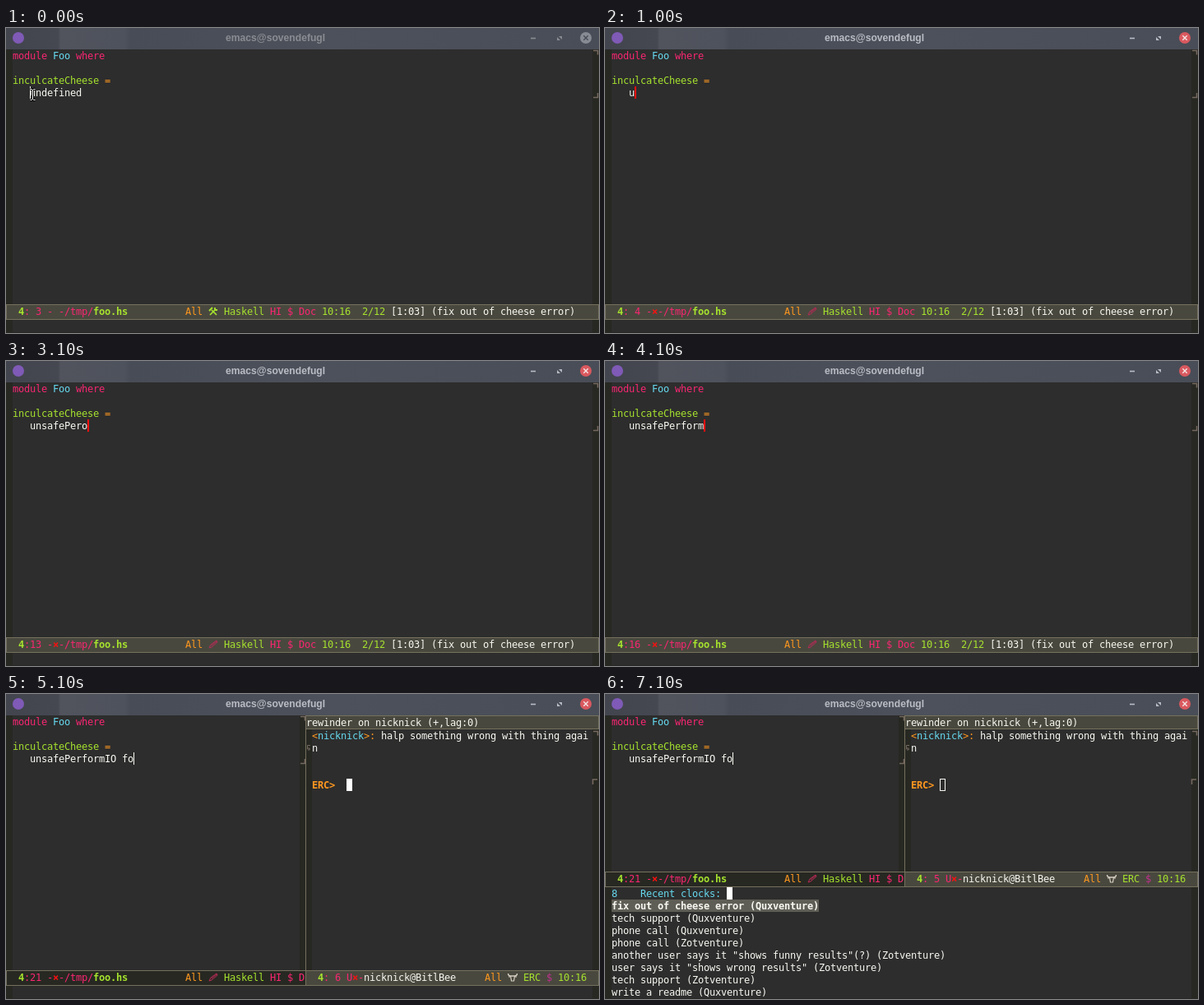
Write an HTML page that moves like this. It is 721 px wide and 371 px high and loops after 8 s.

```html
<!DOCTYPE html>
<html lang="en">
<head>
<meta charset="utf-8">
<title>Editor session</title>
<style>
  html, body { margin: 0; width: 100%; height: 100%; overflow: hidden; background: #272822; }
  svg { display: block; }
  text { font: 12px "DejaVu Sans Mono", monospace; white-space: pre; }
  .bold { font-weight: bold; }
  .title { font: bold 12.15px "Liberation Sans", Arial, sans-serif; }
</style>
</head>
<body>
<svg id="stage" width="721" height="371" viewBox="0 0 721 371">
  <defs>
    <linearGradient id="bar">
      <stop offset="0" stop-color="#42454e"/>
      <stop offset=".088" stop-color="#454851"/>
      <stop offset=".092" stop-color="#51545d"/>
      <stop offset=".2" stop-color="#4e525c"/>
      <stop offset=".21" stop-color="#484c56"/>
      <stop offset=".55" stop-color="#4d515b"/>
      <stop offset="1" stop-color="#494d57"/>
    </linearGradient>
  </defs>
  <rect width="721" height="26" fill="url(#bar)"/>
  <circle cx="15" cy="12" r="7" fill="#7f5ab6"/>
  <g id="view"></g>
</svg>
<script>
const LOOP = 8000, CELL = 7, ROW = 15;
const C = {
  bg: '#2d2d2d', fringe: '#272822', bar: '#49483e', edge: '#75715e', mark: '#75695f',
  fg: '#f8f8f2', pink: '#f92672', blue: '#66d9ef', green: '#a6e22e', orange: '#fd971f',
  red: '#ff1010', purple: '#c0308f', pick: '#5f5e56'
};
const PROJECT = ['Quxventure', 'Zotventure'];
const CLOCKS = [
  ['fix out of cheese error', 0], ['tech support', 0], ['phone call', 0], ['phone call', 1],
  ['another user says it "shows funny results"(?)', 1],
  ['user says it "shows wrong results"', 1], ['tech support', 1], ['write a readme', 0]
];

// [start, changed properties]
const STEPS = [
  [0, { code: 'undefined', col: 3, icon: 'tools', pointer: true, focus: false, cursor: C.fg,
        dirty: false, split: false, menu: false, chat: 6 }],
  [200, { focus: true, cursor: C.red }],
  [500, { icon: 'cut', cursor: null }],
  [700, { code: '', icon: 'pen', pointer: false, dirty: true, cursor: C.red }],
  ...[
    [1000, 'u'], [1200, 'un'], [1400, 'uns'], [1600, 'unsa'], [1800, 'unsaf'], [1900, 'unsafe'],
    [2200, 'unsafeP'], [2300, 'unsafePe'], [2700, 'unsafePer'], [3100, 'unsafePero'],
    [3700, 'unsafePer'], [3900, 'unsafePerf'], [4000, 'unsafePerfor'], [4100, 'unsafePerform'],
    [4400, 'unsafePerformI'], [4600, 'unsafePerformIO'], [4800, 'unsafePerformIO '],
    [4900, 'unsafePerformIO f'], [5000, 'unsafePerformIO fo']
  ].map(([at, code]) => [at, { code, col: 3 + code.length }]),
  [5100, { split: true, cursor: C.fg }],
  [6200, { chat: 5 }],
  [7100, { menu: true }]
];

const states = [];
for (const [at, change] of STEPS) {
  states.push({ ...states[states.length - 1], ...change, at });
}

const view = document.getElementById('view');

function add(tag, attrs, content) {
  const el = document.createElementNS('http://www.w3.org/2000/svg', tag);
  for (const key in attrs) el.setAttribute(key, attrs[key]);
  if (content) el.textContent = content;
  view.append(el);
}

const box = (x, y, width, height, fill) => add('rect', { x, y, width, height, fill });
const frame = (x, y, w, h, stroke, fill = 'none') =>
  add('rect', { x: x + .5, y: y + .5, width: w - 1, height: h - 1, stroke, fill });
const line = (d, stroke, width = 1) =>
  add('path', { d, stroke, fill: 'none', 'stroke-width': width });

// Places parts [text, colour, bold] on the character grid; returns the end x.
function run(x, y, ...parts) {
  for (const [str, fill, bold] of parts) {
    const xs = [...str].map((_, i) => x + i * CELL).join(' ');
    if (str.trim()) add('text', { x: xs, y, fill, class: bold ? 'bold' : '' }, str);
    x += str.length * CELL;
  }
  return x;
}

function titleBar(focus) {
  const ink = focus ? '#b9bcc4' : '#8a8c92';
  add('text', { x: 267, y: 16, fill: ink, class: 'title' }, 'emacs@sovendefugl');
  line('M638 12.5h6', ink, 1.6);
  add('path', { d: 'M672 10h4v4zM670 11v4h4z', fill: ink });
  add('circle', { cx: 705, cy: 12, r: 7, fill: focus ? '#d9595f' : '#878b94' });
  line('M702.3 9.3l5.4 5.4m0-5.4l-5.4 5.4', focus ? '#f4e4e4' : '#484c56', 1.4);
}

// Draws a mode line symbol and returns the width it takes.
function symbol(kind, x, y) {
  if (kind === 'cut') {
    run(x, y, ['✂', C.green]);
    return 7;
  }
  if (kind === 'tools') {
    line(`M${x + 2} ${y}l7 -7M${x + 10} ${y}l-6 -6`, C.green, 1.7);
    line(`M${x + 1} ${y - 5}l4 -4M${x + 8} ${y - 9}v3h3`, C.green, 1.8);
  } else if (kind === 'pen') {
    line(`M${x + 1} ${y}l3 -1l7 -6l-1 -2l-7 5z`, '#b52a55');
    line(`M${x + 4} ${y - 3}l6 -5`, '#b52a55');
  } else {
    line(`M${x + .5} ${y - 9}q0 3 3 3h5q3 0 3 -3`, '#d8d0c4', 1.3);
    line(`M${x + 3.5} ${y - 6}l1 6h3l1 -6M${x + 1} ${y - 5}h2m6 0h2`, '#d8d0c4', 1.2);
  }
  return 12;
}

const position = col => ':' + String(col).padStart(2);

function leftModeLine(s, bottom) {
  const h = s.icon === 'cut' ? 17 : 19, top = bottom - h, y = top + 13;
  frame(0, top, s.split ? 365 : 721, h, C.edge, s.split ? C.fringe : C.bar);
  run(15, y, ['4', C.green, true], [position(s.col) + ' -', C.pink],
    [s.dirty ? '×' : ' ', C.red, true], ['-/tmp/', C.pink], ['foo.hs', C.green, true]);
  run(218, y, ['All', C.orange]);
  const x = 246 + symbol(s.icon, 246, y) + CELL;
  if (s.split) {
    run(x, y, ['Haskell ', C.green], ['HI $ D', C.pink]);
  } else {
    run(x, y, ['Haskell ', C.green], ['HI $ Doc ', C.pink], ['10:16  2/12 ', C.green],
      ['[1:03] (fix out of cheese error)', C.fg]);
  }
}

function rightModeLine(s, bottom) {
  const top = bottom - 19, y = top + 13;
  frame(364, top, 357, 19, C.edge, C.bar);
  run(379, y, ['4', C.green, true], [position(s.chat) + ' U', C.pink], ['×', C.red, true],
    ['-', C.pink], ['nicknick@BitlBee', C.fg]);
  run(582, y, ['All', C.orange]);
  symbol('cow', 610, y);
  run(629, y, ['ERC ', C.green], ['$ ', C.purple], ['10:16', C.green]);
}

function codeWindow(s) {
  const edge = s.split ? 357 : 713;
  run(8, 38, ['module ', C.pink], ['Foo ', C.blue], ['where', C.pink]);
  run(8, 68, ['inculcateCheese ', C.green], ['=', C.orange]);
  run(29, 83, [s.code, C.fg]);
  line(`M${edge + 1} 27.5h5.5v5M${edge + 1} 84.5h5.5v-5.5`, C.mark, 1.6);
  if (s.cursor) {
    const thin = s.split || !s.focus;
    box(8 + s.col * CELL, 71, thin ? 1 : 2, ROW, s.cursor);
  }
  if (s.pointer) {
    const beam = 'M29.5 74.5h2l1 1l1 -1h2M32.5 75v12M29.5 87.5h2l1 -1l1 1h2';
    line(beam, '#000', 3);
    line(beam, '#fff');
  }
}

function chatWindow(s, bottom) {
  box(357, 26, 15, bottom - 26, C.fringe);
  frame(364, 26, 357, 17, C.edge, C.bar);
  line(`M364.5 26V${bottom}`, C.edge);
  run(365, 39, ['rewinder on nicknick (+,lag:0)', C.fg]);
  run(372, 55, ['<', C.orange], ['nicknick', C.blue], ['>:', C.orange],
    [' halp something wrong with thing agai', C.fg]);
  run(372, 70, ['n', C.fg]);
  run(372, 115, ['ERC>', C.orange, true]);
  const x = 372 + s.chat * CELL;
  if (s.menu) frame(x, 103, CELL, ROW, C.fg);
  else box(x, 103, CELL, ROW, '#fff');
  line('M714 45.5h5.5v5M713.5 110v-6h5.5', C.mark, 1.6);
  line('M370 62.5h-3.5v4.5h3m-2 -2l2 2l-2 2', C.mark);
}

function clockMenu() {
  run(8, 247, ['8    Recent clocks:', C.blue]);
  box(148, 235, CELL, ROW, '#fff');
  CLOCKS.forEach(([task, id], i) => {
    const label = `${task} (${PROJECT[id]})`, top = 250 + i * ROW;
    if (!i) box(8, top, label.length * CELL, ROW, C.pick);
    run(8, top + 12, [label, C.fg, !i]);
  });
}

function draw(s) {
  view.replaceChildren();
  const bottom = s.menu ? 235 : 355;
  titleBar(s.focus);
  box(0, 26, 721, 345, C.fringe);
  box(8, 26, 705, 344, C.bg);
  if (s.split) chatWindow(s, bottom - 19);
  codeWindow(s);
  leftModeLine(s, bottom);
  if (s.split) rightModeLine(s, bottom);
  if (s.menu) clockMenu();
}

const start = performance.now();
let shown;

function tick() {
  const t = (performance.now() - start) % LOOP;
  const state = states.findLast(s => s.at <= t);
  if (state !== shown) draw(shown = state);
  requestAnimationFrame(tick);
}
tick();
</script>
</body>
</html>
```
